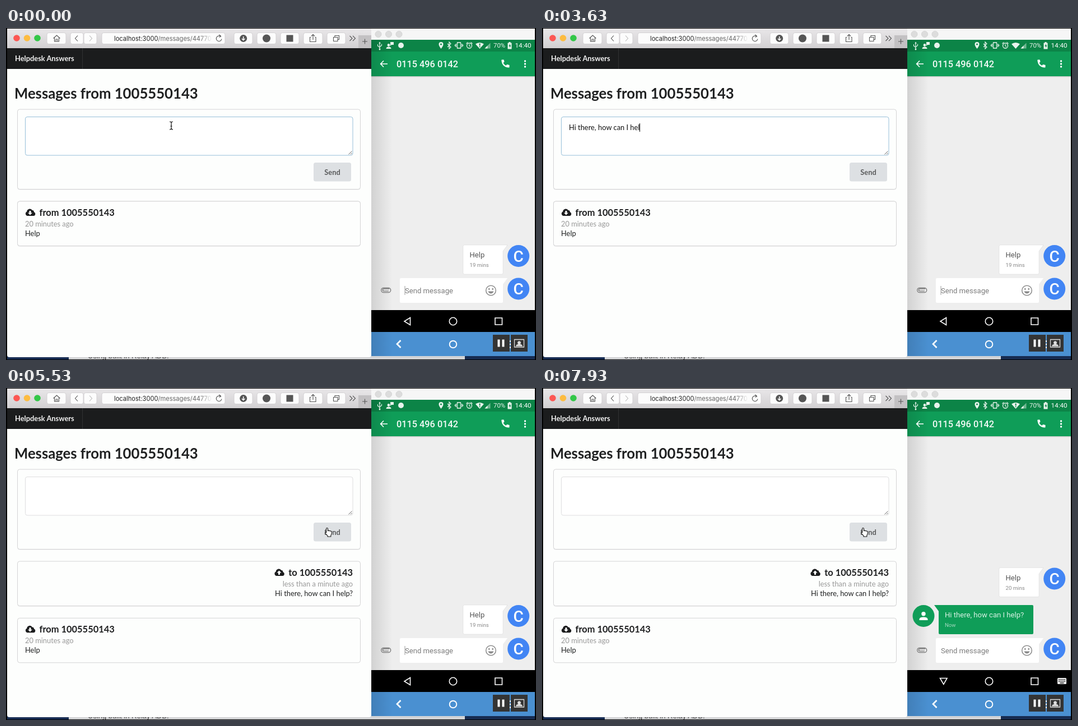
Animation of 946x592 px, one loop 7.96 s. Source, as an HTML page:

```html
<!DOCTYPE html>
<html lang="en">
<head>
<meta charset="utf-8">
<title>Support chat</title>
<style>
  html, body { margin: 0; width: 100%; height: 100%; overflow: hidden; background: #000; }
  svg { display: block; width: 946px; height: 592px; }
  text { white-space: pre; }
  .web { font: 12.85px Lato, sans-serif; fill: #1f2021; }
  .bold { font-weight: 700; }
  .h1 { font-size: 25.7px; font-weight: 700; }
  .h3 { font-size: 16.45px; font-weight: 700; }
  .dim { fill: #999; }
  .ph { font: 13.1px Roboto, sans-serif; fill: #555; }
  .small { font-size: 9.6px; fill: #8a8a8a; }
  .end { text-anchor: end; }
  .mid { text-anchor: middle; }
  .card { fill: #fdfefd; stroke: #d4d4d5; }
  .btn { fill: #fcfcfc; stroke: #cdcbcd; stroke-width: .8; }
  .line { fill: none; stroke: #555; stroke-width: 1.1; }
  .white { fill: none; stroke: #fff; stroke-width: 1.6; }
</style>
</head>
<body>
<svg viewBox="0 0 946 592" xmlns="http://www.w3.org/2000/svg">
  <defs>
    <linearGradient id="bar" x2="0" y2="1"><stop stop-color="#e9e7e9"/><stop offset="1" stop-color="#d2d0d2"/></linearGradient>
    <linearGradient id="shade"><stop stop-opacity=".12"/><stop offset="1" stop-opacity="0"/></linearGradient>
    <linearGradient id="fade"><stop stop-color="#fcfcfc" stop-opacity="0"/><stop offset="1" stop-color="#fcfcfc"/></linearGradient>
    <path id="cloud" d="M4 13.5a4 4 0 0 1-1.3-7.6A5.2 5.2 0 0 1 12.4 3.6a3 3 0 0 1 3 3.1A3.5 3.5 0 0 1 14.6 13.5Z"/>
    <g id="avatar">
      <circle r="19.5" fill="#4285f4"/>
      <text class="ph mid" y="10" style="font-size:28px;font-weight:500;fill:#fff">C</text>
    </g>
  </defs>

  <!-- desktop -->
  <path fill="#172c52" d="M2 580H944V591H2Z"/>
  <path fill="#d3d4d6" d="M112 580H819V591H112Z"/>
  <text x="146" y="589" font-family="Liberation Sans, sans-serif" font-size="13" fill="#333">Using built in Relay ADB.</text>
  <path fill="#000" d="M0 591H946V592H0Z"/>

  <!-- phone -->
  <g>
    <path fill="#f6f6f6" d="M652 1H944V21H652Z"/>
    <g fill="#dcdcdc" stroke="#cfcfcf" stroke-width=".7">
      <circle cx="664.5" cy="11" r="5.6"/><circle cx="683" cy="11" r="5.6"/><circle cx="701.5" cy="11" r="5.6"/>
    </g>
    <path fill="#0c8447" d="M652 21H944V42H652Z"/>
    <path fill="#eee" d="M652 86H944V503H652Z"/>
    <path fill="#0f9d58" d="M652 42H944V86H652Z"/>
    <path fill="#0002" d="M652 86H944V87.5H652Z"/>
    <path fill="#4a90d1" d="M652 542H944V585H652Z"/>
    <rect x="652" y="21" width="38" height="564" fill="url(#shade)"/>
    <path fill="#000" d="M652 503H944V542H652Z"/>

    <!-- status bar -->
    <g fill="#e7f3ec">
      <path d="M667 24.5l1.8 3h-1.2v9h-1.2v-9h-1.2zM665.6 38a1.4 1.4 0 1 1 2.8 0 1.4 1.4 0 0 1-2.8 0"/>
      <path d="M663.5 29v3l3.5 2.5M670.5 28.5v2.7l-3.5 2.5" fill="none" stroke="#e7f3ec" stroke-width="1.1"/>
      <circle cx="683" cy="30.5" r="2.4"/><path d="M678.5 37q0-3.5 4.5-3.5t4.5 3.5zM686 25h6v5h-4l-2 2z"/>
      <circle cx="705" cy="31" r="5"/>
      <path d="M776.500 25a4 4 0 0 1 4 4q0 3-4 8-4-5-4-8a4 4 0 0 1 4-4z"/><circle cx="776.5" cy="29" r="1.5" fill="#0c8447"/>
      <path d="M788 28l6 6-3 3v-12l3 3-6 6" fill="none" stroke="#e7f3ec" stroke-width="1.2"/>
      <path d="M805.500 26h6v10h-6zM803.300 28v6M813.700 28v6M801.500 29.500v3M815.500 29.500v3" fill="none" stroke="#e7f3ec" stroke-width="1.3"/>
      <circle cx="827" cy="31.500" r="4.500" fill="none" stroke="#e7f3ec" stroke-width="1.300"/>
      <path d="M827 29v3l2 1M821.500 28l3-2.500M832.500 28l-3-2.500" fill="none" stroke="#e7f3ec" stroke-width="1.200"/>
      <path d="M838 28.500q7.500-5 15 0l-7.500 8.500z"/>
      <path d="M854.500 36.500l10-10v10z" opacity=".45"/><path d="M854.500 36.500l5-5v5z"/>
      <path d="M895.500 26.500h2v-1.500h3v1.500h2v11h-7z"/><path fill="#0c8447" d="M899.800 28l-2.500 4.500h1.700v3l2.300-4.500h-1.500z"/>
    </g>
    <g id="alert" fill="#0c8447"><path d="M844.700 27.500h1.800v4h-1.800zM844.700 32.500h1.800v1.700h-1.800z"/></g>
    <text class="ph" x="870" y="35" style="font-size:11.4px;fill:#e7f3ec">70%</text>
    <text class="ph" x="908.5" y="35" style="font-size:11.7px;fill:#fff">14:40</text>

    <!-- app bar -->
    <path class="white" d="M681 64H669M674 58.500L668.600 64L674 69.500"/>
    <text class="ph" x="697" y="70" style="font-size:16.3px;font-weight:500;fill:#f5fbf8">0115 496 0142</text>
    <path fill="#fff" d="M885.500 56.500h3l1 3.800-2 2q1.700 3.200 4.800 4.800l2-2 4.200 1v3.300q0 1.200-1.200 1.200-12-.700-13-13 0-1.100 1.200-1.100z"/>
    <g fill="#fff"><circle cx="926.500" cy="59" r="1.700"/><circle cx="926.500" cy="64" r="1.700"/><circle cx="926.500" cy="69" r="1.700"/></g>

    <!-- conversation -->
    <g id="help">
      <path fill="#fff" stroke="#0001" d="M818 387H895L887 398V437q0 2-2 2H818q-2 0-2-2V389q0-2 2-2z"/>
      <text class="ph" x="827.500" y="409">Help</text>
      <text class="ph small" id="mins" x="827.500" y="426"></text>
      <use href="#avatar" x="914.700" y="406.500"/>
    </g>
    <g id="reply">
      <path fill="#0f9d58" d="M700 387H875q2 0 2 2V437q0 2-2 2H710q-2 0-2-2V398z"/>
      <text class="ph" x="719" y="409" style="fill:#d9f2e5">Hi there, how can I help?</text>
      <text class="ph small" x="719" y="426" style="fill:#a4d9bf">Now</text>
      <circle cx="681" cy="406.500" r="19.500" fill="#0f9d58"/>
      <circle cx="681" cy="402.800" r="3.700" fill="#fff"/><path fill="#fff" d="M673.500 414v-1.500q0-4 7.500-4t7.500 4v1.500z"/>
    </g>

    <!-- composer -->
    <path fill="#fff" d="M705 446H895L887 457V488q0 2-2 2H705q-2 0-2-2V448q0-2 2-2z"/>
    <text class="ph" x="712" y="473" style="fill:#7c7c7c">Send message</text>
    <path id="phoneCaret" fill="#999" d="M711.500 460h1v16h-1z"/>
    <path d="M684 465h-9.500a2 2 0 0 0 0 4.200h8.500M674 471.700h8.500a4.200 4.200 0 0 0 0-8.400h-8.500a4.200 4.200 0 0 0 0 8.400" fill="none" stroke="#777" stroke-width="1.300"/>
    <circle cx="865.500" cy="468" r="8.800" fill="none" stroke="#8a8a8a" stroke-width="1.500"/>
    <g fill="#8a8a8a"><circle cx="862.300" cy="465.500" r="1.400"/><circle cx="868.700" cy="465.500" r="1.400"/><path d="M860.500 469.500h10q-1.500 4-5 4t-5-4z"/></g>
    <use href="#avatar" x="914.700" y="465"/>

    <!-- navigation -->
    <path class="white" id="back" d="M721.500 516.500v13L711 523z"/>
    <circle class="white" cx="798" cy="523" r="6.700"/>
    <path class="white" d="M873 517h12.500v12H873z"/>
    <g id="keys">
      <rect x="920" y="517" width="16" height="11" rx="1.500" fill="#eee"/>
      <path d="M922 520h12M922 523h12" stroke="#000" stroke-width="1.600" stroke-dasharray="1.600 1"/><path d="M924.500 526h7" stroke="#000" stroke-width="1.300"/>
    </g>
    <path class="white" style="stroke-width:2.700" d="M704.500 557L698 563.500L704.500 570"/>
    <circle class="white" style="stroke-width:1.900" cx="798" cy="564" r="6.300"/>
    <g fill="#fff"><circle cx="900" cy="558.500" r="1.500"/><circle cx="900" cy="564" r="1.500"/><circle cx="900" cy="569.500" r="1.500"/></g>
    <path fill="#343434" d="M869 547H899V577H869zM901 547H931V577H901z"/>
    <path fill="#fff" d="M877.500 555.500h4v13h-4zM885.500 555.500h4v13h-4z"/>
    <path fill="none" stroke="#ddd" stroke-width="1.300" d="M907.500 555.500h17v13.500h-17z"/>
    <path fill="#ddd" d="M910 567.500q0-3 4.300-3.800a3 3 0 1 1 3.400 0q4.300.800 4.300 3.800z"/>
  </g>

  <!-- browser -->
  <path fill="#fdfefd" d="M2 1H652V583q0 4-4 4H6q-4 0-4-4z"/>
  <path fill="url(#bar)" d="M2 1H652V36H2z"/>
  <path fill="#c3c1c3" d="M629 13H652V36H629z"/>
  <path class="line" d="M640.500 19.500v9M636 24h9"/>
  <circle cx="19" cy="18" r="5.800" fill="#fc5753"/><circle cx="37.500" cy="18" r="5.800" fill="#fdbc40"/><circle cx="56" cy="18" r="5.800" fill="#33c748"/>
  <g id="buttons"></g>
  <g class="line">
    <path d="M84.500 18.500l6-5.500 6 5.500M86.500 17.500v6.500h8v-6.500M89 24v-4h3v4"/>
    <path d="M128 13.500l-4.500 5 4.500 5"/><path stroke="#bbb" d="M149 13.500l4.500 5-4.500 5"/>
    <path d="M384 16a4.800 4.800 0 1 0 .9 3.500M380 12l3.200 2-2.500 3"/>
    <path d="M544 16.500h-1.500v8h10.500v-8h-1.500M548 21v-9M545 14.500l3-3 3 3"/>
    <path d="M584.500 16.500h7.500v7h-7.500zM587 16.500v-3h7.500v7h-2.500"/>
    <path d="M613.500 14l4.500 4.500-4.500 4.500M619 14l4.500 4.500-4.500 4.500"/>
  </g>
  <circle cx="423.700" cy="18.500" r="6.500" fill="#555"/><path stroke="#fff" stroke-width="1.500" fill="none" d="M423.700 15v6M421 19l2.700 2.700 2.700-2.700"/>
  <circle cx="465" cy="18.500" r="7" fill="#555"/>
  <rect x="500.500" y="12.500" width="12" height="12" fill="#555"/>
  <text x="193" y="23" font-family="Inter, sans-serif" font-size="11.1" fill="#222">localhost:3000<tspan fill="#666">/messages/44770</tspan></text>
  <rect x="346" y="9" width="22" height="19" fill="url(#fade)"/>

  <path fill="#1b1c1d" d="M2 36H652V73H2z"/>
  <path fill="#303132" d="M136 36h1v37h-1z"/>
  <text class="web bold" x="16" y="59" style="fill:#f2f2f2">Helpdesk Answers</text>
  <text class="web h1" x="15" y="126">Messages from 1005550143</text>

  <g id="cards"></g>
  <rect id="area" x="34.500" y="158.500" width="584.500" height="68.500" rx="3.500" fill="#fff"/>
  <path d="M611.500 225.500l6-6M615 225.500l2.500-2.500" stroke="#666"/>
  <text class="web" id="typed" x="48" y="182" style="fill:#111"></text>
  <path id="caret" fill="#000" d="M0 170h1v15h-1z"/>
  <g id="send">
    <rect x="549" y="240" width="67" height="33.500" rx="3.500" fill="#dde0e3"/>
    <text class="web bold mid" x="582.500" y="262" style="fill:#5a5b5c">Send</text>
  </g>
  <g id="sent">
    <use href="#cloud" x="479" y="321.500" fill="#1b1c1d"/>
    <path fill="#fff" d="M487.500 325.500l4 4h-2.500v3.500h-3v-3.500h-2.500z"/>
    <text class="web h3 end" x="619" y="335">to 1005550143</text>
    <text class="web dim end" x="619" y="354">less than a minute ago</text>
    <text class="web end" x="619" y="371">Hi there, how can I help?</text>
  </g>
  <g id="received">
    <rect class="card" x="20.500" y="309" width="612" height="79.500" rx="4"/>
    <use href="#cloud" x="34.500" y="321.500" fill="#1b1c1d"/>
    <path fill="#fff" d="M43 333.500l4-4h-2.500v-3.500h-3v3.500h-2.500z"/>
    <text class="web h3" x="59.500" y="335">from 1005550143</text>
    <text class="web dim" x="34" y="354">20 minutes ago</text>
    <text class="web" x="34" y="371">Help</text>
  </g>

  <!-- pointers, hot spot at 0,0 -->
  <g id="beam"><path d="M-3-7q3 0 3 2 0-2 3-2M0-5V5M-3 7q3 0 3-2 0 2 3 2M-1.500 1h3" fill="none" stroke="#111" stroke-width="1.200"/></g>
  <path id="arrow" d="M0 0V13.500l3-2.800 2.300 5 2.300-1-2.200-4.900h4.300z" fill="#000" stroke="#fff" stroke-width=".9"/>
  <path id="hand" d="M-1.300 2q0-1.500 1.300-1.500t1.500 1.500V5.500q1.500-1 2.500.3 1.500-.8 2.300.5 2-.500 2.200 1.500 0 4-1.700 6V16H1V14.500L-3.500 9.500q-.3-1.700 2.200-.7z" fill="#fff" stroke="#111" stroke-width="1.100"/>
</svg>
<script>
  const LOOP = 7960;
  const MESSAGE = "Hi there, how can I help?";
  const TYPE_START = 560, KEY_MS = 134;
  const MOVE_START = 4100, MOVE_END = 4540, CLICK = 4660, POSTED = 5130;
  const REPLY = 6400, REPLY_MS = 300, KEYBOARD = 7400;
  const $ = id => document.getElementById(id);
  const clamp = v => Math.max(0, Math.min(1, v));
  const ease = v => v * v * (3 - 2 * v);
  const show = (id, on) => { $(id).style.display = on ? "" : "none"; };

  $("buttons").innerHTML = [[73, 34], [115, 23], [139, 23], [171, 220], [407, 33], [448, 34], [490, 33], [531, 34], [573, 33]]
    .map(([x, w]) => `<rect class="btn" x="${x}" y="8.500" width="${w}" height="20" rx="3.500"/>`).join("");
  $("cards").innerHTML = [[145, 142.5], [309, 79.5]]
    .map(([y, h]) => `<rect x="20.500" y="${y + 1}" width="612" height="${h}" rx="4" fill="#e4e4e5"/>
      <rect class="card" x="20.500" y="${y}" width="612" height="${h}" rx="4"/>`).join("");

  function drawPointer(t) {
    const p = ease(clamp((t - MOVE_START) / (MOVE_END - MOVE_START)));
    const x = 295 + 278 * p, y = 174 + 75 * p;
    const hidden = t > TYPE_START && t < MOVE_START;
    const onSend = x > 549 && y > 240;
    const busy = t >= CLICK && t < POSTED;
    const kind = hidden ? "" : y < 227 && x < 619 ? "beam" : onSend && !busy ? "hand" : "arrow";
    for (const id of ["beam", "arrow", "hand"]) {
      show(id, id === kind);
      $(id).setAttribute("transform", `translate(${x} ${y})`);
    }
  }

  function drawForm(t) {
    const count = t < TYPE_START ? 0 : Math.min(MESSAGE.length, 1 + Math.floor((t - TYPE_START) / KEY_MS));
    const typed = t < POSTED ? MESSAGE.slice(0, count) : "";
    const typing = count > 0 && count < MESSAGE.length;
    const focused = t < CLICK;
    if ($("typed").textContent !== typed) $("typed").textContent = typed;
    const end = typed ? $("typed").getComputedTextLength() : 0;
    $("caret").setAttribute("transform", `translate(${Math.round(48 + end)} 0)`);
    show("caret", focused && (typing || count > 0 && t % 1000 < 500));
    $("area").setAttribute("stroke", focused ? "#96bfd9" : "#dededf");
    $("send").style.opacity = t >= CLICK && t < POSTED ? .45 : 1;
    show("sent", t >= POSTED);
    $("received").setAttribute("transform", `translate(0 ${t >= POSTED ? 101.3 : 0})`);
  }

  function drawPhone(t) {
    const p = clamp((t - REPLY) / REPLY_MS);
    $("help").setAttribute("transform", `translate(0 ${-66.5 * ease(clamp(p * 1.2))})`);
    $("reply").style.opacity = ease(p);
    $("mins").textContent = t < REPLY ? "19 mins" : "20 mins";
    show("phoneCaret", t % 1030 < 560);
    show("alert", t < 900 || t > 4200);
    show("keys", t >= KEYBOARD);
    $("back").setAttribute("d", t >= KEYBOARD ? "M710.500 517.500h12.500L716.800 528.500z" : "M721.500 516.500v13L711 523z");
  }

  function frame() {
    const t = performance.now() % LOOP;
    drawForm(t);
    drawPointer(t);
    drawPhone(t);
    requestAnimationFrame(frame);
  }
  frame();
</script>
</body>
</html>
```
